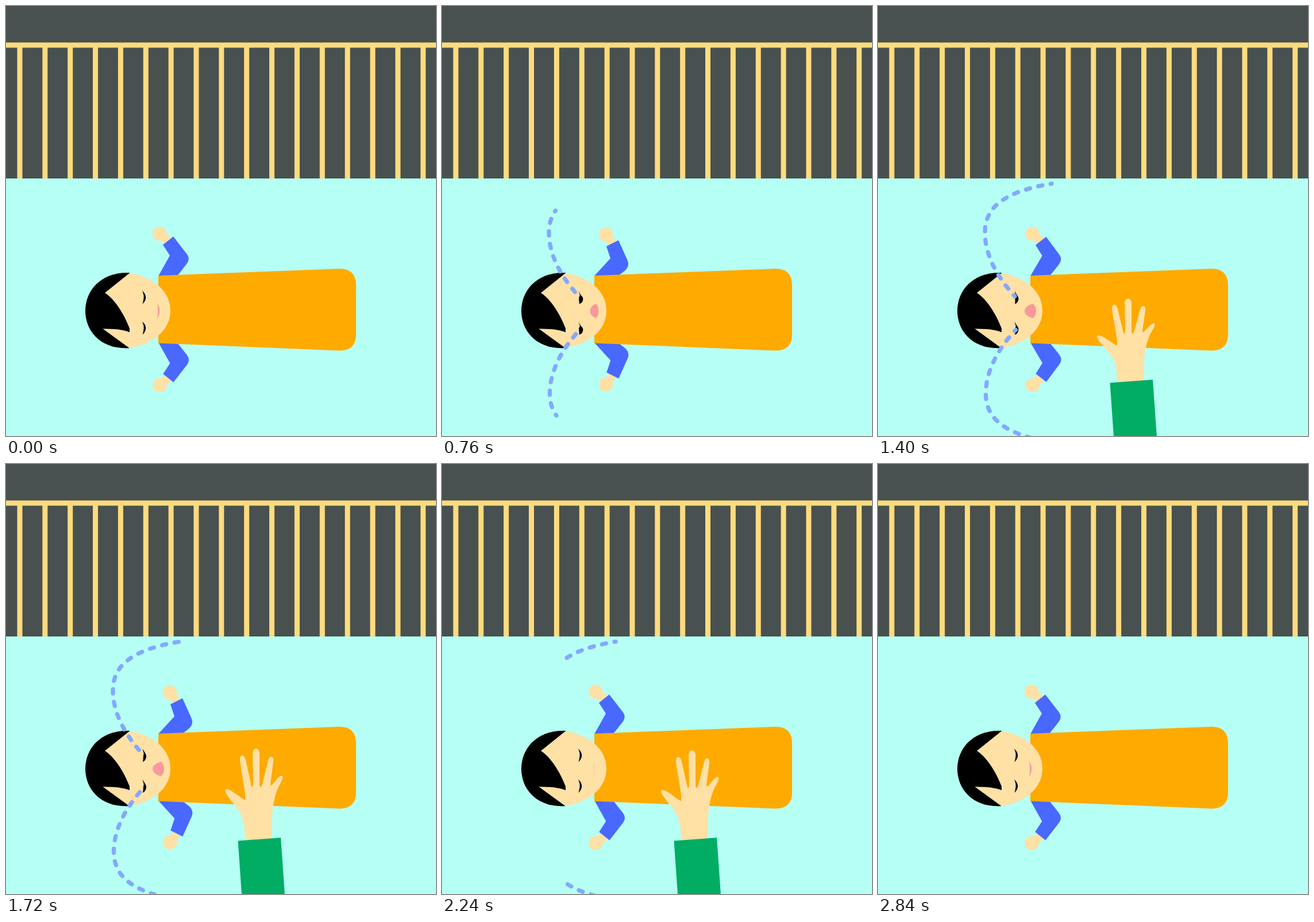
Recreate the animation shown at these times as an HTML page with a canvas. Size 748 by 748 pixels, loop 2880 ms.

```html
<!DOCTYPE html>
<html lang="en">
<head>
<meta charset="utf-8">
<title>Soothing a crying child</title>
<style>
html, body { margin: 0; width: 100%; height: 100%; overflow: hidden; background: #b5fff5; }
canvas { display: block; width: 100vw; height: 100vh; }
</style>
</head>
<body>
<canvas id="stage" width="748" height="748"></canvas>
<script>
const ctx = document.getElementById('stage').getContext('2d');
const LOOP = 2880, STEP = 40;
const SKIN = '#ffe0a5';

const clamp = v => Math.max(0, Math.min(1, v));
const ramp = (t, a, b) => clamp((t - a) / (b - a));
const easeIn = x => 1 - Math.cos(x * Math.PI / 2);
const mix = (a, b, k) => a.map((v, i) => v + (b[i] - v) * k);

function fill(path, color) {
  ctx.fillStyle = color;
  ctx.fill(typeof path === 'string' ? new Path2D(path) : path);
}

// Piecewise linear track through [time, values] keys
function track(keys, t) {
  let i = 0;
  while (i < keys.length - 2 && t > keys[i + 1][0]) i++;
  const [a, va] = keys[i], [b, vb] = keys[i + 1];
  return mix(va, vb, ramp(t, a, b));
}

function drawRoom() {
  ctx.fillStyle = '#b5fff5';
  ctx.fillRect(0, 0, 748, 748);
  ctx.fillStyle = '#48514f';
  ctx.fillRect(0, 0, 748, 300);
  ctx.fillStyle = '#ffdb7e';
  ctx.fillRect(0, 63.5, 748, 9);
  for (let i = 0; i < 17; i++) ctx.fillRect(19.5 + i * 43.85, 64, 9, 236);
}

// hand, sleeve end, elbow curve, body joint
const ARM_REST = [267, 396, 285, 434, 273, 415.5, 291, 401, 315, 432, 321, 440, 314, 449, 299, 468];
const ARM_UP = [285, 397.5, 293, 439, 286, 418, 307, 407.5, 322.5, 442, 327, 452, 318.5, 460, 309, 467.5];

function drawArm(k) {
  const [hx, hy, ix, iy, ax, ay, bx, by, ex, ey, cx, cy, fx, fy, jx, jy] = mix(ARM_REST, ARM_UP, k);
  ctx.strokeStyle = SKIN;
  ctx.lineWidth = 14;
  ctx.lineCap = 'butt';
  ctx.beginPath();
  ctx.moveTo(hx, hy);
  ctx.lineTo((ax + bx) / 2 + 1, (ay + by) / 2 + 1);
  ctx.stroke();
  ctx.beginPath();
  ctx.arc(hx, hy, 12.2, 0, 7);
  ctx.fillStyle = SKIN;
  ctx.fill();
  fill(`M265.5 469L${ix} ${iy}L${ax} ${ay}L${bx} ${by}L${ex} ${ey}Q${cx} ${cy} ${fx} ${fy}L${jx} ${jy}V475H266Z`, '#4968ff');
}

function drawArms(t) {
  const u = ramp(t, 320, 2240) * 4 % 2;
  const k = easeIn(1 - Math.abs(u - 1)) / 0.87;
  drawArm(k);
  ctx.save();
  ctx.translate(0.3, 1055.5);
  ctx.scale(1, -1);
  drawArm(k);
  ctx.restore();
}

function drawBody() {
  fill('M265 469L580 457Q609 457 609 486V571Q609 599.5 580 599.5L265 586.5Z', '#ffaa00');
}

const EYE_CALM = [237, 495, 241, 499, 242.5, 503, 244, 508, 242, 512, 240.5, 516, 237, 518.5, 238.5, 516, 239, 512, 240, 507, 239.5, 503];
const EYE_CRY = [237.5, 495, 239.5, 501, 242, 503.5, 246.5, 507, 245, 512, 243.5, 518, 238.5, 518, 239, 516, 238.3, 512, 237.5, 505, 240, 504];

function drawEyes(t) {
  const [k] = track([[320, [0]], [720, [1]], [1040, [0.9]], [1720, [0.45]], [2240, [0]]], t);
  const p = mix(EYE_CALM, EYE_CRY, k);
  const eye = new Path2D();
  eye.moveTo(p[0], p[1]);
  for (let i = 2; i < 22; i += 4) eye.quadraticCurveTo(p[i], p[i + 1], p[i + 2], p[i + 3]);
  eye.quadraticCurveTo(238.5, 499, p[0], p[1]);
  fill(eye, '#000');
  ctx.save();
  ctx.translate(0, 53.5);
  fill(eye, '#000');
  ctx.restore();
}

function drawMouth(t) {
  const smile = [262.5, 264.8, 269], flat = [264.5, 264.5, 265], open = [269.5, 250.2, 276.8];
  const [c, l, r] = track([[0, smile], [320, flat], [920, open], [1920, open], [2240, flat], [2800, smile]], t);
  fill(`M${c} 518C${r} 523 ${r} 538 ${c} 543C${l} 538 ${l} 523 ${c} 518Z`, '#f9999c');
}

function drawHead(t) {
  fill('M215 464C165 462 138 495 138 530C138 566 165 598 215 595Z', '#000');
  fill('M215 464.5L172 499C194 513 211 548 218 569Q204 561 168.5 561.5L214.5 595C250 589 286 568 286 530C286 492 250 470 215 464.5Z', SKIN);
  drawEyes(t);
  drawMouth(t);
}

const TEAR = new Path2D('M238 505C204 468 186 430 186 394C186 347 225 322 302 309');
const TEAR_LEN = 284, PITCH = 22, DASH = 7.3;

function drawTear(t) {
  const from = ramp(t, 1920, 2400) * TEAR_LEN;
  const to = ramp(t, 480, 960) * TEAR_LEN;
  const shift = (t / 192 + 0.5) % 1;
  ctx.strokeStyle = '#84a8ff';
  ctx.lineWidth = 7.2;
  ctx.lineCap = 'round';
  for (let s = from + (shift - 1) * PITCH; s < to; s += PITCH) {
    const a = Math.max(s, from), b = Math.min(s + DASH, to);
    if (b <= a) continue;
    ctx.setLineDash([b - a, 9999]);
    ctx.lineDashOffset = -a;
    ctx.stroke(TEAR);
  }
  ctx.setLineDash([]);
}

function drawTears(t) {
  drawTear(t);
  ctx.save();
  ctx.translate(1.5, 1068.3);
  ctx.scale(1, -1);
  drawTear(t);
  ctx.restore();
}

const HAND = new Path2D(
  'M416 658C416 620 409 606 396 591Q384 577 381 569Q381 564 387 566C398 571 408 581 416 585' +
  'C418 575 408 530 407 514Q407 507 411 507Q415 507 417 515L427 561Q429 563 430 558' +
  'L429 503Q430 495 435 495Q440 495 441 503L441 559Q443 564 445 560' +
  'L456 516Q458 509 461.5 509Q466 510 465 518L460 556Q460 561 463 558' +
  'L474 545Q480 540 481.5 544Q482 547 477 556C468 572 465 590 463 610L462 658Z');

function drawHelper(t) {
  if (t < 880) return;
  const away = 315 * (easeIn(1 - ramp(t, 880, 1200)) + easeIn(ramp(t, 2560, 2880)));
  const press = (1 - Math.cos(ramp(t, 1200, 2640) * 6 * Math.PI)) / 2;
  ctx.save();
  ctx.translate(away * 0.017, away);
  ctx.save();
  ctx.translate(0, 650);
  ctx.scale(1, (156 - 16 * press) / 155);
  ctx.translate(0, -650);
  fill(HAND, SKIN);
  ctx.restore();
  fill('M403.5 655.5L478 650L499 950L424.5 955Z', '#00ad63');
  ctx.restore();
}

function draw(now) {
  const t = Math.floor(now % LOOP / STEP) * STEP;
  drawRoom();
  drawArms(t);
  drawBody();
  drawHead(t);
  drawTears(t);
  drawHelper(t);
}

let start;
function tick(now) {
  if (start === undefined) start = now;
  draw(now - start);
  requestAnimationFrame(tick);
}
draw(0);
requestAnimationFrame(tick);
</script>
</body>
</html>
```
